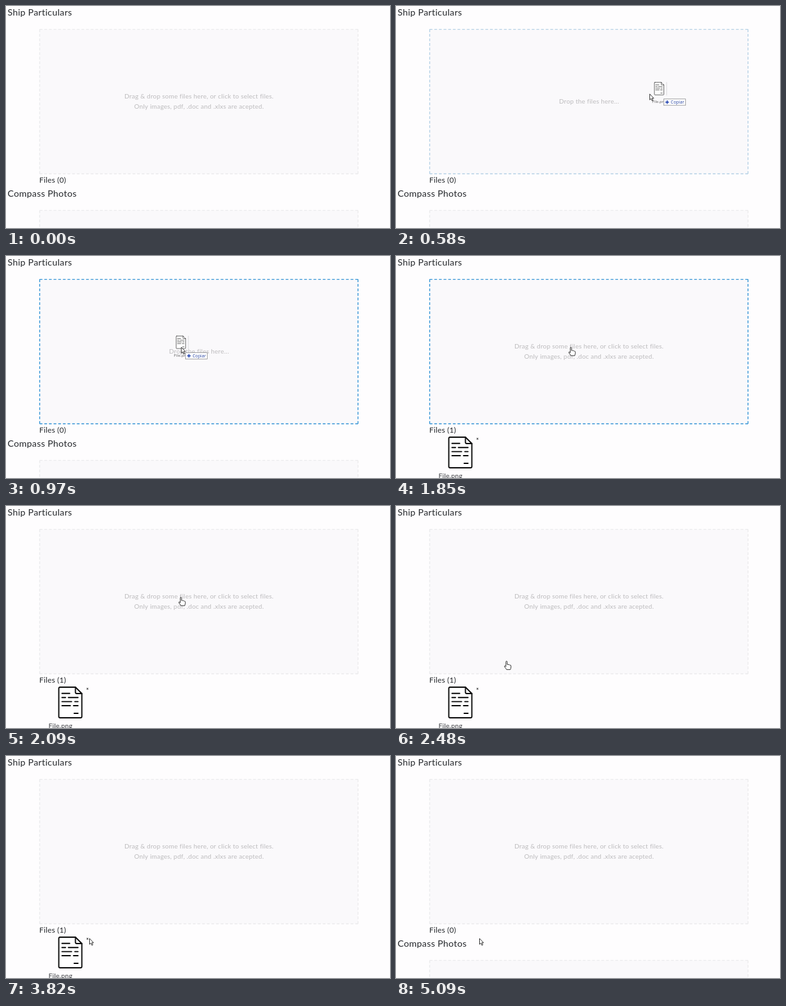
Animation of 600x348 px, one loop 5.58 s. Source, as an HTML page with a canvas:

```html
<!DOCTYPE html>
<html lang="en">
<head>
<meta charset="utf-8">
<title>File drop zone</title>
<style>
  html, body { margin: 0; width: 100%; height: 100%; overflow: hidden; background: #fefdfe; }
  canvas { display: block; width: 600px; height: 348px; }
</style>
</head>
<body>
<canvas id="stage"></canvas>
<script>
const LOOP = 5580;
const ENTER = 420, HOVER = 495, DROP = 1850, REMOVE = 3850;
const FADE = 240;
const SANS = 'Lato, "Open Sans", sans-serif';
const INK = '#25282c', MUTED = '#bdbcbe';
const GRAY = [235, 235, 237], BLUE = [56, 150, 214];

const canvas = document.getElementById('stage');
const ctx = canvas.getContext('2d');
const ratio = window.devicePixelRatio || 1;
canvas.width = 600 * ratio;
canvas.height = 348 * ratio;

const clamp = v => Math.min(1, Math.max(0, v));
const lerp = (a, b, k) => a + (b - a) * k;
const easeInOut = k => k * k * (3 - 2 * k);

function text(str, x, y, size, { color = INK, align = 'left', weight = 400, font = SANS } = {}) {
  ctx.font = `${weight} ${size}px ${font}`;
  ctx.letterSpacing = `${size * 0.02}px`;
  ctx.fillStyle = color;
  ctx.textAlign = align;
  ctx.fillText(str, x, y);
}

const hint = (str, y) => text(str, 301.6, y, 10.05, { color: MUTED, align: 'center' });

function at(x, y, scale, draw) {
  ctx.save();
  ctx.translate(x, y);
  ctx.scale(scale, scale);
  draw();
  ctx.restore();
}

function line(x1, y1, x2, y2) {
  ctx.beginPath();
  ctx.moveTo(x1, y1);
  ctx.lineTo(x2, y2);
  ctx.stroke();
}

// Fits the gaps so that the side starts and ends with a dash
function dashedSide(x1, y1, x2, y2) {
  const dash = 4.3, gap = 2.9;
  const length = Math.hypot(x2 - x1, y2 - y1);
  const count = Math.round((length + gap) / (dash + gap));
  ctx.setLineDash([dash, (length - count * dash) / (count - 1)]);
  line(x1, y1, x2, y2);
  ctx.setLineDash([]);
}

function dropZone(y, active) {
  const x = 52.6, w = 497.4, h = 226.4;
  ctx.fillStyle = '#faf9fb';
  ctx.fillRect(x, y, w, h);
  ctx.strokeStyle = `rgb(${GRAY.map((c, i) => Math.round(lerp(c, BLUE[i], active)))})`;
  ctx.lineWidth = 1.4;
  dashedSide(x, y, x + w, y);
  dashedSide(x, y, x, y + h);
  dashedSide(x + w, y, x + w, y + h);
  dashedSide(x, y + h, x + w, y + h);
}

// Document icon, 38 by 50, origin at its top left
function fileIcon(weight) {
  ctx.strokeStyle = '#0b0b0b';
  ctx.fillStyle = '#fff';
  ctx.lineWidth = weight;
  ctx.lineJoin = ctx.lineCap = 'round';
  const page = new Path2D('M3 1H27L37 11V47Q37 49 35 49H3Q1 49 1 47V3Q1 1 3 1Z');
  ctx.fill(page);
  ctx.stroke(page);
  ctx.stroke(new Path2D('M27 1V9Q27 11 29 11H37'));
  const rows = [[10.7, 6, 18], [17.2, 6, 11.5], [17.2, 16, 31], [23.6, 6, 21],
                [23.6, 26, 31], [30, 6, 19], [30, 24, 31], [42, 25, 31]];
  for (const [y, a, b] of rows) line(a, y, b, y);
}

function cursor(shape, x, y) {
  at(x, y, 1, () => {
    ctx.fillStyle = '#fff';
    ctx.strokeStyle = '#222';
    ctx.lineWidth = 0.9;
    ctx.lineJoin = 'round';
    ctx.fill(shape);
    ctx.stroke(shape);
  });
}
const ARROW = new Path2D('M0 0V9.2L2.1 7.3L3.7 10.8L5.2 10.1L3.6 6.8H6.4Z');
const HAND = new Path2D('M-1.7 1Q-1.7 0 -.7 0T.3 1V5.2Q1.8 4.4 2.5 5.6Q4 5 4.5 6.2Q6.2 5.8 6.2 7.6' +
  'V9.8Q6 11.4 5.2 13.2H-.7Q-1.7 11.2 -3.9 8.8Q-4.3 7.2 -3.1 7.4L-1.7 8.6Z');

function ghost(x, y) {
  ctx.globalAlpha = 0.72;
  at(x - 8.5, y - 18, 0.41, () => fileIcon(2));
  ctx.strokeStyle = '#c4c4c8';
  ctx.lineWidth = 0.8;
  line(x + 11, y - 18, x + 11, y + 3);
  text('File.png', x - 0.5, y + 15, 6.2, { color: '#333', align: 'center' });
  ctx.globalAlpha = 1;

  ctx.fillStyle = '#fff';
  ctx.fillRect(x + 6, y + 8, 35, 11);
  ctx.strokeStyle = '#8d8d90';
  ctx.strokeRect(x + 6.5, y + 8.5, 34, 10);
  ctx.strokeStyle = '#1d3fae';
  ctx.lineWidth = 1.5;
  line(x + 9, y + 13.5, x + 14.6, y + 13.5);
  line(x + 11.8, y + 10.7, x + 11.8, y + 16.3);
  text('Copiar', x + 17.5, y + 16, 6.6, { color: '#2440a0', font: '"Open Sans", sans-serif' });
}

function dragPos(t) {
  const left = Math.pow(1 - clamp((t - 410) / 560), 2.77);
  return [274 + 336 * left, 143 - 14 * left];
}

// Progress from the drop point to the remove button
const WALK = [[2150, 0], [2300, 0.3], [2480, 0.7], [2700, 0.88], [2880, 1]];
function walk(t) {
  for (let i = 1; i < WALK.length; i++) {
    const [t0, a] = WALK[i - 1], [t1, b] = WALK[i];
    if (t < t1) return lerp(a, b, clamp((t - t0) / (t1 - t0)));
  }
  return 1;
}

function pointer(t) {
  if (t < ENTER) return;
  if (t < DROP) {
    ghost(...dragPos(t - 17));
    cursor(ARROW, ...dragPos(t));
    return;
  }
  const k = walk(t);
  const x = lerp(274, 130.5, k), y = lerp(143, 286, k);
  cursor(y < 263 ? HAND : ARROW, x, y);
}

function draw(t) {
  ctx.setTransform(ratio, 0, 0, ratio, 0, 0);
  ctx.fillStyle = '#fefdfe';
  ctx.fillRect(0, 0, 600, 348);

  const dragging = t >= HOVER && t < DROP;
  const listed = t >= DROP && t < REMOVE;
  const active = easeInOut(clamp((t - HOVER) / FADE)) - easeInOut(clamp((t - DROP) / FADE));

  text('Ship Particulars', 2.5, 15, 14.25);
  dropZone(36.6, active);
  if (dragging) {
    hint('Drop the files here...', 152.8);
  } else {
    hint('Drag & drop some files here, or click to select files.', 145.3);
    hint('Only images, pdf, .doc and .xlxs are acepted.', 160.5);
  }

  text(`Files (${listed ? 1 : 0})`, 52, 276.7, 11.8);
  if (listed) {
    at(81.5, 283, 1, () => fileIcon(1.9));
    text('x', 127.5, 287.6, 6, { color: '#111', align: 'center', weight: 700 });
    text('File.png', 66.5, 348, 10.4, { color: '#3a3c40' });
  } else {
    text('Compass Photos', 2.5, 299, 14.25);
    dropZone(320.4, 0);
  }
  pointer(t);
}

const start = performance.now();
function tick() {
  draw((performance.now() - start) % LOOP);
  requestAnimationFrame(tick);
}
tick();
</script>
</body>
</html>
```
